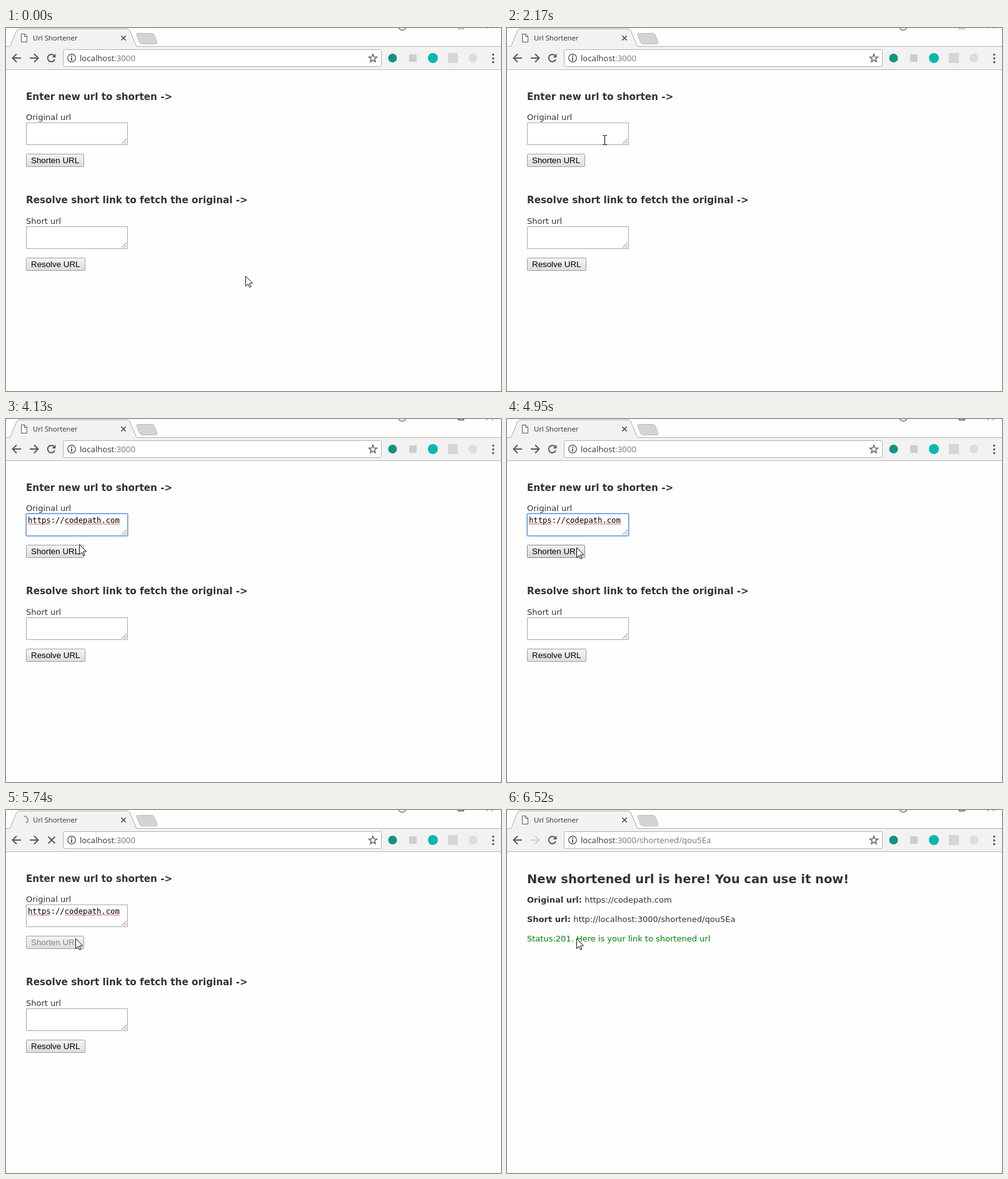
Recreate the animation shown at these times as an HTML page with a canvas. Size 792x580 px, loop 8000 ms.

```html
<!DOCTYPE html>
<html lang="en">
<head>
<meta charset="utf-8">
<title>Url Shortener</title>
<style>
html, body { margin: 0; width: 100%; height: 100%; overflow: hidden; background: #fefefe; }
canvas { display: block; }
</style>
</head>
<body>
<canvas id="stage" width="792" height="580"></canvas>
<script>
const ctx = document.getElementById('stage').getContext('2d');
const LOOP = 8000;
const PAGE = '"DejaVu Sans", sans-serif';
const UI = '"Open Sans", sans-serif';
const BUTTON = '"Liberation Sans", sans-serif';
const MONO = '"DejaVu Sans Mono", monospace';
const INK = '#333', ICON = '#5a5a5a', BAR = '#f2f2f2';

// Pointer keys: start time, left, top, text beam or arrow
const POINTER = [
  [0, 383, 396], [710, 352, 360], [830, 284, 283], [950, 236, 233],
  [1110, 211, 224], [1260, 198, 216], [1380, 181, 205], [1500, 167, 196],
  [1620, 158, 190], [1900, 157, 187], [2050, 154, 174, true],
  [2170, 153, 171, true], [3970, 143, 176, true], [4130, 117, 200], [4270, 111, 205]
];
const FOCUS = 2420, PASTE = 3290, HOVER = 4270, PRESS = 5230;
const SEND = 5350, DISABLE = 5500, COMMIT = 6400, DONE = 6520;
const CARET = [[2420, 3010], [3290, 3850], [4390, 4950]];

const within = (t, a, b) => t >= a && t < b;

function text(str, x, y, font, color = INK) {
  ctx.font = font;
  ctx.fillStyle = color;
  ctx.fillText(str, x, y);
  return x + ctx.measureText(str).width;
}

function path(points, close) {
  ctx.beginPath();
  points.forEach(([x, y]) => ctx.lineTo(x, y));
  if (close) ctx.closePath();
}

function stroke(color, width = 1) {
  ctx.strokeStyle = color;
  ctx.lineWidth = width;
  ctx.stroke();
}

function fill(color) {
  ctx.fillStyle = color;
  ctx.fill();
}

function line(color, width, ...points) {
  path(points);
  stroke(color, width);
}

function rect(x, y, w, h, color) {
  ctx.fillStyle = color;
  ctx.fillRect(x, y, w, h);
}

function disc(x, y, r, color) {
  ctx.beginPath();
  ctx.arc(x, y, r, 0, 7);
  fill(color);
}

function frame(x, y, w, h, r, color) {
  ctx.beginPath();
  ctx.roundRect(x + 0.5, y + 0.5, w - 1, h - 1, r);
  stroke(color);
}

function cross(x, y, r, width, color = ICON) {
  line(color, width, [x - r, y - r], [x + r, y + r]);
  line(color, width, [x + r, y - r], [x - r, y + r]);
}

function windowButtons(active) {
  const color = active ? '#111' : '#999';
  ctx.beginPath();
  ctx.arc(634, -2.5, 6, 0, Math.PI);
  stroke('#777', 1.6);
  line(color, 1, [723.5, 0], [723.5, 1.5], [732.5, 1.5], [732.5, 0]);
  cross(774, -3.5, 5, 1, color);
}

function spinner(t) {
  const loading = t >= COMMIT;
  const start = loading ? 0 : -(t - SEND) / 1000 * 4.2;
  ctx.beginPath();
  ctx.arc(29, 16, 6, start, start + (loading ? 3.8 : 2.6));
  stroke(loading ? '#98a3cc' : '#999', 2);
}

function tab(t) {
  const busy = within(t, SEND, DONE);
  rect(0, 0, 792, 30, '#fefefe');
  line('#b4b4b4', 1, [0, 29.5], [792, 29.5]);
  path([[5, 30.5], [7, 28], [17, 4], [20, 1.5], [195, 1.5], [198, 4], [208, 28], [211, 30.5]]);
  fill(BAR);
  stroke('#aaa');
  path([[208.5, 10], [210, 8.5], [234, 8.5], [237, 10.5], [242, 23], [241, 25.5], [217, 25.5], [214, 23.5]], true);
  fill('#d4d4d4');
  stroke('#bcbcbc');
  if (busy) spinner(t);
  else {
    path([[24.5, 9.5], [30, 9.5], [33.5, 13], [33.5, 22.5], [24.5, 22.5]], true);
    fill('#fff');
    stroke(ICON);
    line(ICON, 1, [29.5, 9.5], [29.5, 13.5], [33.5, 13.5]);
  }
  if (within(t, COMMIT, DONE)) {
    const fade = ctx.createLinearGradient(155, 0, 176, 0);
    fade.addColorStop(0, INK);
    fade.addColorStop(1, '#3330');
    ctx.save();
    ctx.beginPath();
    ctx.rect(40, 4, 136, 24);
    ctx.clip();
    text('localhost:3000/shortened/qou5Ea', 43, 20, '11.3px ' + UI, fade);
    ctx.restore();
  } else text('Url Shortener', 43, 20, '11.3px ' + UI);
  cross(188, 16, 3.7, 1.7);
}

function arrow(x, dir, color) {
  line(color, 2, [x - 7 * dir, 48], [x + 6 * dir, 48]);
  line(color, 2, [x, 41.5], [x + 6.5 * dir, 48], [x, 54.5]);
}

function star(x, y) {
  const points = [];
  for (let i = 0; i < 10; i++) {
    const a = -Math.PI / 2 + i * Math.PI / 5, r = i % 2 ? 2.9 : 6.8;
    points.push([x + r * Math.cos(a), y + r * Math.sin(a)]);
  }
  path(points, true);
  stroke(ICON, 1.4);
}

function toolbar(t) {
  rect(0, 30, 792, 36, BAR);
  rect(0, 66, 792, 1, '#b9b9b9');
  arrow(17, -1, ICON);
  arrow(45, 1, t >= COMMIT ? '#d0d0d0' : ICON);
  if (within(t, SEND, DONE)) cross(73, 48, 5.3, 2);
  else {
    ctx.beginPath();
    ctx.arc(72.5, 48, 5.8, 0.35, 5.5);
    stroke(ICON, 2);
    path([[79.5, 41], [79.5, 47], [73.5, 47]], true);
    fill(ICON);
  }

  ctx.beginPath();
  ctx.roundRect(91.5, 34.5, 509, 27, 2);
  fill('#fff');
  stroke('#b2b2b2');
  ctx.beginPath();
  ctx.arc(105, 48, 6.3, 0, 7);
  stroke(ICON, 1.4);
  rect(104, 44, 2, 2, ICON);
  rect(104, 47, 2, 5, ICON);
  const font = '13.2px ' + UI;
  const x = text('localhost', 118, 53, font);
  text(':3000' + (t >= COMMIT ? '/shortened/qou5Ea' : ''), x, 53, font, '#777');
  star(587, 48.5);

  disc(618.5, 48, 7, '#13937f');
  rect(645, 42, 12, 12, '#cdcdcd');
  disc(683, 48, 8, '#08b8ae');
  rect(707, 40, 16, 16, '#d6d6d6');
  disc(747, 48, 7, '#dcdcdc');
  for (let y = 42; y <= 54; y += 6) disc(779.5, y + 0.5, 1.7, ICON);
}

function textarea(y, focused) {
  rect(32, y, 163, 36, '#fff');
  if (focused) {
    frame(31, y - 1, 165, 38, 2, '#a9c6f2');
    frame(32, y, 163, 36, 0, '#5c92e0');
  } else frame(32, y, 163, 36, 0, '#a9a9a9');
  line('#777', 1, [185, y + 34], [193, y + 26]);
  line('#777', 1, [189.5, y + 34], [193, y + 30.5]);
}

function button(label, y, w, state) {
  const shades = {
    hover: ['#f2f2f2', '#d6d6d6', '#8a8a8a'],
    press: ['#dedede', '#ececec', '#8a8a8a']
  }[state] || ['#f5f5f5', '#dcdcdc', '#a0a0a0'];
  const g = ctx.createLinearGradient(0, y, 0, y + 21);
  g.addColorStop(0, shades[0]);
  g.addColorStop(1, shades[1]);
  rect(32, y, w, 21, g);
  frame(32, y, w, 21, 1, shades[2]);
  text(label, 40, y + 15, '13.33px ' + BUTTON, state === 'disabled' ? '#858585' : '#000');
}

function squiggle(x, end) {
  const points = [];
  for (let i = 0; x <= end; i++, x += 2) points.push([x, i % 2 ? 166.8 : 168.6]);
  line('#e8383d', 0.9, ...points);
}

function form(t) {
  const heading = 'bold 15.2px ' + PAGE, body = '13px ' + PAGE;
  text('Enter new url to shorten ->', 32, 115, heading);
  text('Original url', 32, 147, body);
  textarea(151, within(t, FOCUS, PRESS));
  if (t >= PASTE) {
    text('https://codepath.com', 35, 166, '12.2px ' + MONO, '#000');
    squiggle(35, 72);
    squiggle(94, 182);
  }
  if (CARET.some(([a, b]) => within(t, a, b))) rect(t < PASTE ? 35 : 182, 154, 1, 15, '#000');
  const state = t >= DISABLE ? 'disabled' : t >= PRESS ? 'press' : t >= HOVER ? 'hover' : '';
  button('Shorten URL', 201, 93, state);

  text('Resolve short link to fetch the original ->', 32, 280, heading);
  text('Short url', 32, 313, body);
  textarea(317, false);
  button('Resolve URL', 367, 95, '');
}

function result() {
  const body = '13px ' + PAGE;
  const row = (label, value, y) => {
    const x = text(label, 32, y, 'bold ' + body);
    text(' ' + value, x, y, body);
  };
  text('New shortened url is here! You can use it now!', 32, 117, 'bold 19.5px ' + PAGE);
  row('Original url:', 'https://codepath.com', 148);
  row('Short url:', 'http://localhost:3000/shortened/qou5Ea', 179);
  text('Status:201. Here is your link to shortened url', 32, 210, body, '#008000');
}

function pointer(t) {
  const [, x, y, beam] = POINTER.findLast(key => t >= key[0]);
  if (beam) {
    rect(x + 3, y + 1, 1, 14, '#000');
    for (const edge of [y, y + 15]) {
      rect(x, edge, 3, 1, '#000');
      rect(x + 4, edge, 3, 1, '#000');
    }
    return;
  }
  ctx.save();
  ctx.translate(x + 0.5, y + 0.5);
  path([[0, 0], [0, 16], [3.7, 12.6], [6.2, 18], [8.4, 17], [6, 11.6], [11, 11.3]], true);
  fill('#fff');
  stroke('#111');
  ctx.restore();
}

function draw(now) {
  const t = now % LOOP;
  rect(0, 0, 792, 580, '#fefefe');
  tab(t);
  windowButtons(t >= FOCUS);
  toolbar(t);
  if (t < DONE) form(t);
  else result();
  pointer(t);
}

let origin;
function tick(now) {
  origin ??= now;
  draw(now - origin);
  requestAnimationFrame(tick);
}
requestAnimationFrame(tick);
</script>
</body>
</html>
```
